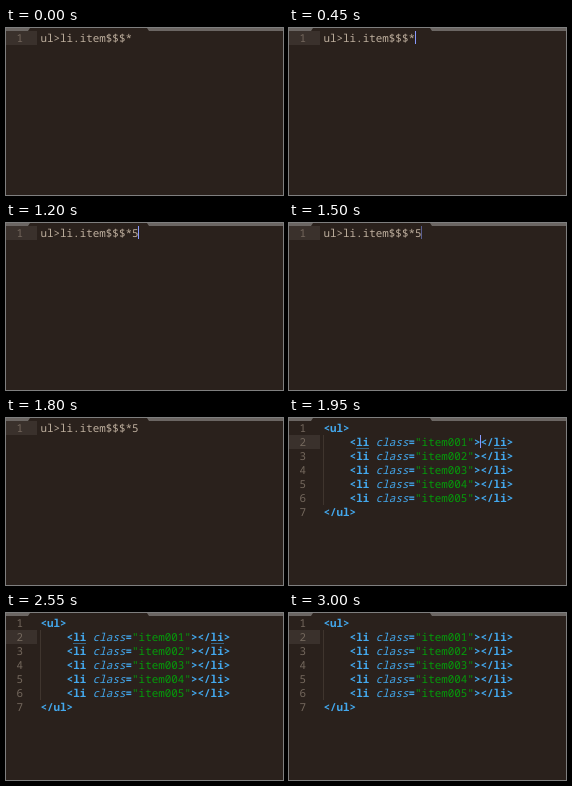
Write an HTML page that moves like this. It is 277 px wide and 167 px high and loops after 3150 ms.

```html
<!DOCTYPE html>
<html lang="en">
<head>
<meta charset="utf-8">
<title>Abbreviation expansion</title>
<style>
html, body { margin: 0; width: 100%; height: 100%; overflow: hidden; background: #2a211c; }
svg { display: block; }
text {
  font: 500 10.92px "Noto Sans Mono", "DejaVu Sans Mono", monospace;
  text-rendering: geometricPrecision;
  white-space: pre;
  fill: #bdae9d;
}
.num { fill: #74685d; }
.tag { fill: #43a8ed; font-weight: bold; }
.attr { fill: #43a8ed; font-style: italic; }
.str { fill: #049b0a; }
</style>
</head>
<body>
<svg width="277" height="167" viewBox="0 0 277 167">
  <path d="M0 0H24L22 3H0ZM141 0H277V3H143Z" fill="#6b6663"/>
  <rect id="row" width="31" height="14" fill="#3a312c"/>
  <g id="numbers"></g>
  <text id="typed" x="34.4" y="14"></text>
  <g id="list"></g>
  <path id="match" d="M67 30.5H80M205 30.5H218" stroke="#43a8ed" opacity=".5"/>
  <rect id="caret" width="1" height="13" fill="#889aff"/>
</svg>
<script>
const $ = id => document.getElementById(id);
const LOOP = 3150, EXPAND = 1950;
const LEFT = 34.4, CHAR = 6.55, LINE = 14;
const span = (kind, s) => `<tspan class="${kind}">${s}</tspan>`;
const line = (x, row, s) => `<text x="${x}" y="${14 + row * LINE}">${s}</text>`;

const item = n => span('tag', '&lt;li ') + span('attr', 'class') + span('tag', '=') +
  span('str', `"item00${n}"`) + span('tag', '&gt;&lt;/li&gt;');

// The list starts with its indent guide
let list = '<path d="M34.5 17V87" stroke="#3f352e"/>' +
  line(LEFT, 0, span('tag', '&lt;ul&gt;')) + line(LEFT, 6, span('tag', '&lt;/ul&gt;'));
for (let n = 1; n <= 5; n++) list += line(LEFT + 4 * CHAR, n, item(n));
$('list').innerHTML = list;

let numbers = '';
for (let i = 0; i < 7; i++) numbers += line(10.4, i, span('num', i + 1));
$('numbers').innerHTML = numbers;

// Each blink: start time, column, row, time at full strength
const blinks = [[450, 14, 0, 300], [1200, 15, 0, 300], [EXPAND, 24, 1, 450]];
const show = (el, on) => el.setAttribute('visibility', on ? 'visible' : 'hidden');

function draw(t) {
  const expanded = t >= EXPAND;
  show($('typed'), !expanded);
  show($('list'), expanded);
  show($('match'), expanded && t < 3000);
  [...$('numbers').children].forEach((el, i) => show(el, expanded || i === 0));
  $('typed').textContent = 'ul>li.item$$$*' + (t >= 1200 ? '5' : '');
  $('row').setAttribute('y', expanded ? 17 : 3);

  const blink = blinks.filter(b => t >= b[0]).pop();
  let opacity = 0;
  if (blink) {
    const [start, col, row, hold] = blink;
    const age = t - start;
    opacity = age < hold ? 1 : age < hold + 150 ? 0.5 : 0;
    $('caret').setAttribute('x', Math.floor(LEFT + col * CHAR));
    $('caret').setAttribute('y', 3 + row * LINE);
  }
  $('caret').setAttribute('opacity', opacity);
}

const begin = performance.now();
function tick() {
  draw((performance.now() - begin) % LOOP);
  requestAnimationFrame(tick);
}
tick();
</script>
</body>
</html>
```
